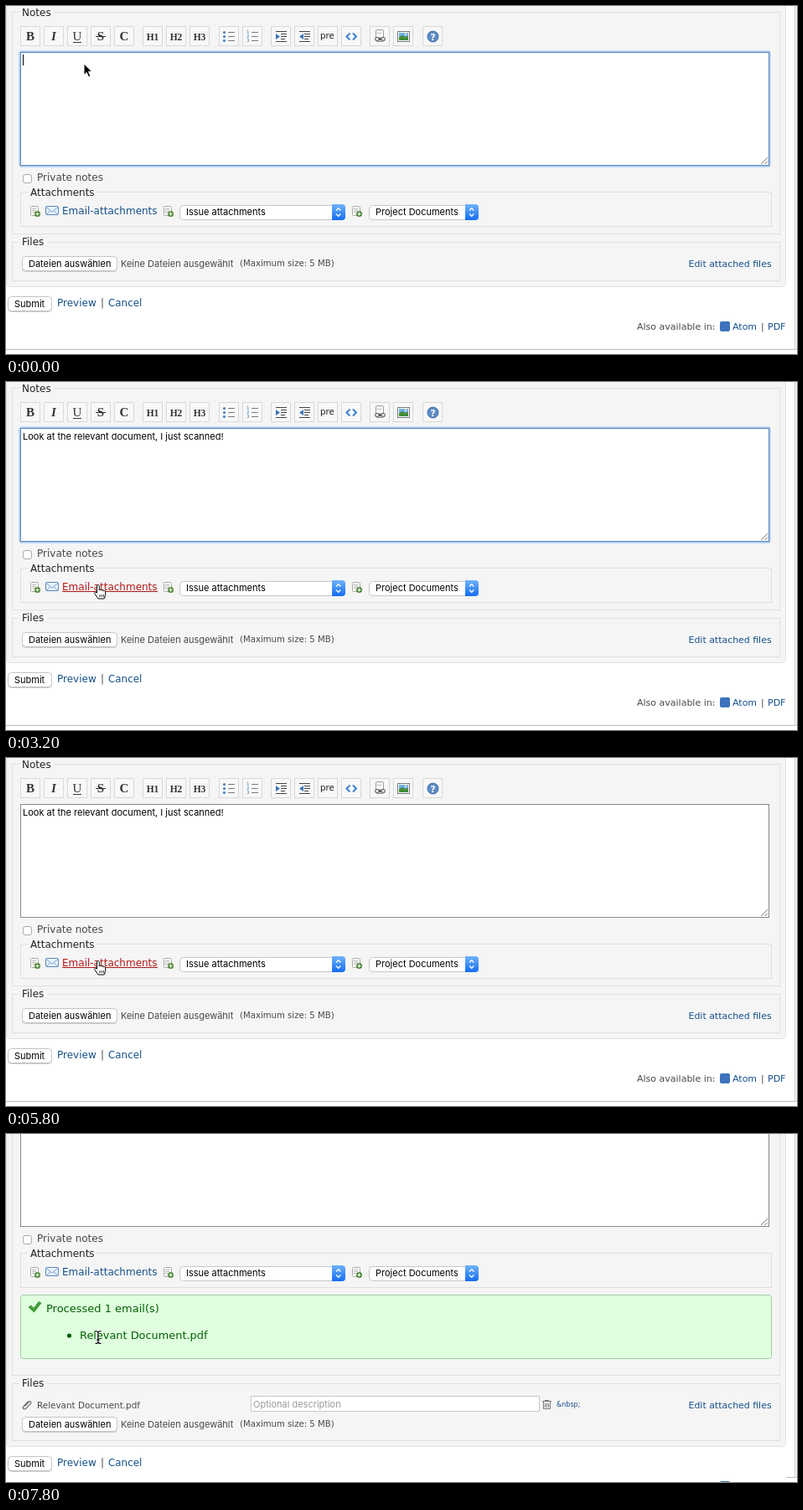
Recreate the animation shown at these times as an HTML page. Size 944 by 416 pixels, loop 8 s.

```html
<!DOCTYPE html>
<html lang="en">
<head>
<meta charset="utf-8">
<title>Attach documents to an issue</title>
<style>
  html, body { margin: 0; width: 100%; height: 100%; overflow: hidden; background: #fff; }
  svg { display: block; width: 944px; height: 416px; }
  text { white-space: pre; }
  .ui { font: 11px Inter, Roboto, sans-serif; }
  .web { font-family: "DejaVu Sans", sans-serif; }
  .serif { font-family: "Liberation Serif", serif; font-weight: bold; }
</style>
</head>
<body>
<svg id="stage" viewBox="0 0 944 416"></svg>
<script>
const LINK = '#15508a', INK = '#222', GREY = '#484848', PAGE = '#f5f5f5', EDGE = '#e0e0e0';
const MESSAGE = 'Look at the relevant document, I just scanned!';

// Markup helpers; boxes are aligned to whole pixels.
const web = (x, y, s, size = 12, fill = INK, extra = '') =>
  `<text class="web" x="${x}" y="${y}" font-size="${size}" fill="${fill}" ${extra}>${s}</text>`;
const ui = (x, y, s, fill = '#000') => `<text class="ui" x="${x}" y="${y}" fill="${fill}">${s}</text>`;
const box = (x, y, w, h, fill, stroke, r = 0, extra = '') =>
  `<rect x="${x + .5}" y="${y + .5}" width="${w}" height="${h}" rx="${r}" fill="${fill}" stroke="${stroke}" ${extra}/>`;
const line = (d, stroke, width = 1, extra = '') =>
  `<path d="${d}" fill="none" stroke="${stroke}" stroke-width="${width}" ${extra}/>`;
const shape = (d, fill, extra = '') => `<path d="${d}" fill="${fill}" ${extra}/>`;
const at = (x, y, s) => `<g transform="translate(${x} ${y})">${s}</g>`;
const group = (id, s) => `<g id="${id}">${s}</g>`;
const legend = (x, y, w, s) =>
  `<rect x="${x - 3}" y="${y - 10}" width="${w + 6}" height="13" fill="${PAGE}"/>` + web(x, y, s);

const button = (x, y, w, s) => box(x, y + 1, w, 17, '#ddd', '#ccc', 4) + box(x, y, w, 17, '#fff', '#c4c4c4', 4) + ui(x + 8, y + 13, s);

const select = (x, w, s) =>
  box(x, 238, w, 17, '#fff', '#c6c6c6', 4) +
  shape(`M${x + w - 15} 237h12a4 4 0 0 1 4 4v11a4 4 0 0 1-4 4h-12z`, 'url(#blue)') +
  line(`M${x + w - 10} 244.500l2.700-2.800 2.700 2.800m0 4l-2.700 2.800-2.700-2.800`, '#fff', 1.3) +
  ui(x + 8, 250, s);

const addIcon = x => at(x, 239,
  box(1, 0, 9, 11, '#fbfbf8', '#aaa', 1) + line('M3 3.500h5M3 5.500h5M3 7.500h3', '#bbb') +
  '<circle cx="9.500" cy="9.500" r="3.500" fill="#4f8a38"/>' + line('M9.500 7.500v4M7.500 9.500h4', '#fff', 1.2));

const envelope = at(47, 239,
  box(0, 0, 15, 10, '#eaf3fc', '#5c88b8', 1) + line('M1 1.500l7 5.500 7-5.500M1 10l5-4M15 10l-5-4', '#739cc9'));

function toolbar() {
  const xs = [17, 45, 73, 101, 129, 163, 191, 219, 254, 282, 316, 344, 372, 400, 434, 462, 497];
  const glyph = (s, size, extra = '') =>
    `<text class="serif" x="12" y="17" text-anchor="middle" font-size="${size}" fill="#333" ${extra}>${s}</text>`;
  const rows = line('M11 7.500h8M11 12.500h8M11 17.500h8', '#777');
  const indent = arrow => line('M6 6.500h13M12 9.500h7M12 12.500h7M12 15.500h5M6 18.500h13', '#444') + shape(arrow, '#3d74b8');
  const icons = [
    glyph('B', 15), glyph('I', 15, 'font-style="italic"'),
    glyph('U', 15, 'style="font-weight:normal"') + line('M7 19.500h10', '#333'),
    glyph('S', 15) + line('M6 12.500h12', '#333'), glyph('C', 15),
    ...['H1', 'H2', 'H3'].map(s => glyph(s, 11.5)),
    [7, 12, 17].map(y => `<circle cx="6.500" cy="${y + .5}" r="1.600" fill="#4a80c4"/>`).join('') + rows,
    [9, 14, 19].map((y, i) => web(5, y, i + 1, 5.5, '#3d74b8')).join('') + rows,
    indent('M6 9l5 3.500-5 3.500z'), indent('M11 9l-5 3.500 5 3.500z'),
    web(3, 15, 'pre', 10.2, '#222'),
    line('M10.500 8.500l-4 4 4 4M14 8.500l4 4-4 4', '#3682d2', 2),
    box(7, 4, 9, 14, '#f9f9f9', '#999', 1) + line('M9 8.500h5', '#bbb') +
      box(6, 13, 6, 4, '#ddd', '#555', 2) + box(12, 13, 6, 4, '#ddd', '#555', 2) + line('M10 15.500h5', '#333'),
    box(5, 6, 14, 12, '#fff', '#777') + shape('M7 8h11v5H7z', '#6faee5') +
      shape('M7 13l4-2 3 2 4-1v5H7z', '#438d38') + '<circle cx="15" cy="9.500" r="1.200" fill="#fff0a0"/>',
    '<circle cx="12.500" cy="12.500" r="6.500" fill="#5d8dc5" stroke="#3d6ca5"/>' + web(9.5, 16.5, '?', 10.5, '#fff', 'font-weight="bold"')
  ];
  return xs.map((x, i) => at(x, 24, box(0, 0, 23, 23, '#f8f8f8', '#d8d8d8') + icons[i])).join('');
}

const notes =
  `<rect id="notesBox" x="7.500" y="7.500" width="916" fill="none" stroke="${EDGE}"/>` + legend(19, 12, 35, 'Notes') + toolbar() +
  group('glow', box(15, 53, 897, 139, '#a9c9f3', '#c5dbf7', 3)) +
  `<rect id="area" x="17.500" y="55.500" width="893" height="135" fill="#fff"/>` +
  line('M901 189l8-8M905.500 189l3.500-3.500', '#777') +
  `<text id="typed" class="ui" x="20" y="69"></text><rect id="caret" y="58" width="1" height="13"/>` +
  box(20, 201, 10, 10, '#fff', '#aaa', 2.5) + web(37, 209, 'Private notes', 12, GREY) +
  box(17, 222, 896, 41, 'none', EDGE) + legend(29, 227, 76, 'Attachments') +
  [28, 187, 412].map(addIcon).join('') + envelope +
  group('mail', web(67, 249, 'Email-attachments', 12, 'currentColor') +
    `<path id="underline" d="M67 250.500h114" stroke="currentColor"/>`) +
  select(207, 197, 'Issue attachments') + select(433, 130, 'Project Documents');

const result =
  box(17, 272, 896, 76, '#dfffdf', '#9fcf9f', 3) +
  shape('M27 287l3-2 3 3.500 6-8 3 1.500-8.500 11z', '#3fa535', 'stroke="#2a7d25" stroke-width=".7"') +
  web(48, 293, 'Processed 1 email(s)', 13, '#005f00') +
  '<circle cx="75.500" cy="321" r="2.600" fill="#005f00"/>' + web(88, 325, 'Relevant Document.pdf', 12.9, '#005f00') +
  line('M22.500 405.500l5-5.500c1.500-1.500 3.500.5 2 2l-5.500 6c-2.500 2.500-5-.5-3-2.500l5.500-6', '#666', 1.1) +
  web(37, 408, 'Relevant Document.pdf', 10.4, GREY) +
  box(292, 393, 344, 18, '#fff', '#c8c8c8') + ui(295, 407, 'Optional description', '#999') +
  line('M640 399.500h11M643 398.500h5M641.500 400v8.500h8V400M643.500 402v5M645.500 402v5M647.500 402v5', '#777') +
  web(657, 406, '&amp;nbsp;', 8, LINK);

const files = `<rect id="filesBox" x="7.500" y="282.500" width="916" fill="none" stroke="${EDGE}"/>` +
  legend(19, 286, 27, 'Files') + web(814.5, 312, 'Edit attached files', 10.95, LINK);

const chooser = button(19, 299, 113, 'Dateien auswählen') +
  ui(137, 312, 'Keine Dateien ausgewählt', GREY) + web(279, 311, '(Maximum size: 5 MB)', 10.15, GREY);

const actions = button(2, 347, 52, 'Submit') + web(61, 359, 'Preview', 12, LINK) +
  web(113, 359, '|', 12, GREY) + web(122, 359, 'Cancel', 11.9, LINK) +
  web(753, 387, 'Also available in:', 11, GREY) +
  '<rect x="852" y="377" width="12" height="12" rx="2" fill="#3b72bb"/>' +
  web(867, 387, 'Atom', 11, LINK) + web(901, 387, '|', 11, GREY) + web(909, 387, 'PDF', 11, LINK);

// Pointers are drawn around their hot spot.
const pointers =
  group('arrow', shape('M0 0v13.500l3.200-3 2.300 5.300 2.300-1-2.300-5.200h4.300z', '#000', 'stroke="#fff"')) +
  group('beam', line('M-3.500-7.500q3.500 0 3.500 2v11q0 2-3.500 2M3.500-7.500q-3.500 0-3.500 2M0 5.500q0 2 3.500 2M-2 3h4', '#fff', 2.4, 'opacity=".7"') +
    line('M-3.500-7.500q3.500 0 3.500 2v11q0 2-3.500 2M3.500-7.500q-3.500 0-3.500 2M0 5.500q0 2 3.500 2M-2 3h4', '#000', 1.2)) +
  group('hand', shape('M-1.500 1c0-2 2.800-2 2.800 0v5c.3-1.300 2.400-1.200 2.600.2.500-1 2.300-.8 2.500.6.700-.7 2.300-.3 2.300 1.200v3.500l-1.500 4.500H0L-3.800 10.500c-1.200-2 .7-3.200 2.300-1.300z', '#fff', 'stroke="#000" stroke-linejoin="round"') +
    line('M2 11v3M4.200 11v3M6.400 11v3', '#000', .8));

document.getElementById('stage').innerHTML =
  `<defs><linearGradient id="blue" x2="0" y2="1"><stop stop-color="#6db3fa"/><stop offset="1" stop-color="#156df2"/></linearGradient></defs>
  <rect width="944" height="416" fill="#fff"/><rect x="942" width="2" height="411" fill="#f0f0f0"/>` +
  line('M941.500 0v411', '#d0d0d0') + `<path id="footer" stroke="#bbb"/>` +
  group('page', `<rect id="form" x=".5" y="-20.500" width="930" rx="3" fill="${PAGE}" stroke="${EDGE}"/>` +
    notes + group('files', files) + group('result', result) + group('chooser', chooser) + group('actions', actions)) +
  group('pointer', pointers);

const el = {};
document.querySelectorAll('[id]').forEach(e => el[e.id] = e);
const set = (e, attrs) => { for (const k in attrs) e.setAttribute(k, attrs[k]); };
const show = (e, on) => set(e, { visibility: on ? 'visible' : 'hidden' });
const move = (e, x, y) => set(e, { transform: `translate(${x} ${y})` });

const path = [[0, 93, 69], [200, 93, 69], [2200, 104, 114], [2400, 105, 123], [2600, 106, 140], [3200, 110, 243], [8000, 110, 243]];
function mouseAt(t) {
  const i = path.findIndex(p => p[0] > t), [t0, x0, y0] = path[i - 1], [t1, x1, y1] = path[i];
  const k = (t - t0) / (t1 - t0), e = k * k * (3 - 2 * k);
  return [x0 + (x1 - x0) * e, y0 + (y1 - y0) * e];
}

function draw(now) {
  const t = Math.floor(now % 8000 / 200) * 200;
  const expanded = t >= 6000, scrolled = t >= 7800, focused = t < 4600;

  move(el.page, 0, scrolled ? -80 : 0);
  move(el.files, 0, expanded ? 96 : 0);
  move(el.chooser, 0, expanded ? 119 : 0);
  move(el.actions, 0, expanded ? 118 : 0);
  set(el.notesBox, { height: expanded ? 361 : 265 });
  set(el.filesBox, { height: expanded ? 68 : 46 });
  set(el.form, { height: expanded ? 474 : 356 });
  set(el.footer, { d: `M${expanded ? 931 : 0} 410.500H944` });
  show(el.result, expanded);

  show(el.glow, focused);
  set(el.area, { stroke: focused ? '#5f83b5' : '#888' });
  el.typed.textContent = MESSAGE.slice(0, Math.floor(MESSAGE.length * Math.min(1, t / 2200)));
  set(el.caret, { x: Math.round(20 + el.typed.getComputedTextLength()) });
  show(el.caret, focused && (t < 2400 || Math.floor((t - 2400) / 500) % 2 === 0));

  const [x, y] = mouseAt(t);
  const kind = t < 200 ? 'arrow' : scrolled || y < 190 ? 'beam' : y < 238 ? 'arrow' : 'hand';
  const visible = t < 400 || t >= 2000;
  move(el.pointer, x, y);
  for (const k of ['arrow', 'beam', 'hand']) show(el[k], visible && k === kind);
  set(el.mail, { color: kind === 'hand' ? '#b01818' : LINK });
  show(el.underline, kind === 'hand');
}

const start = performance.now();
function tick() {
  draw(performance.now() - start);
  requestAnimationFrame(tick);
}
tick();
</script>
</body>
</html>
```
